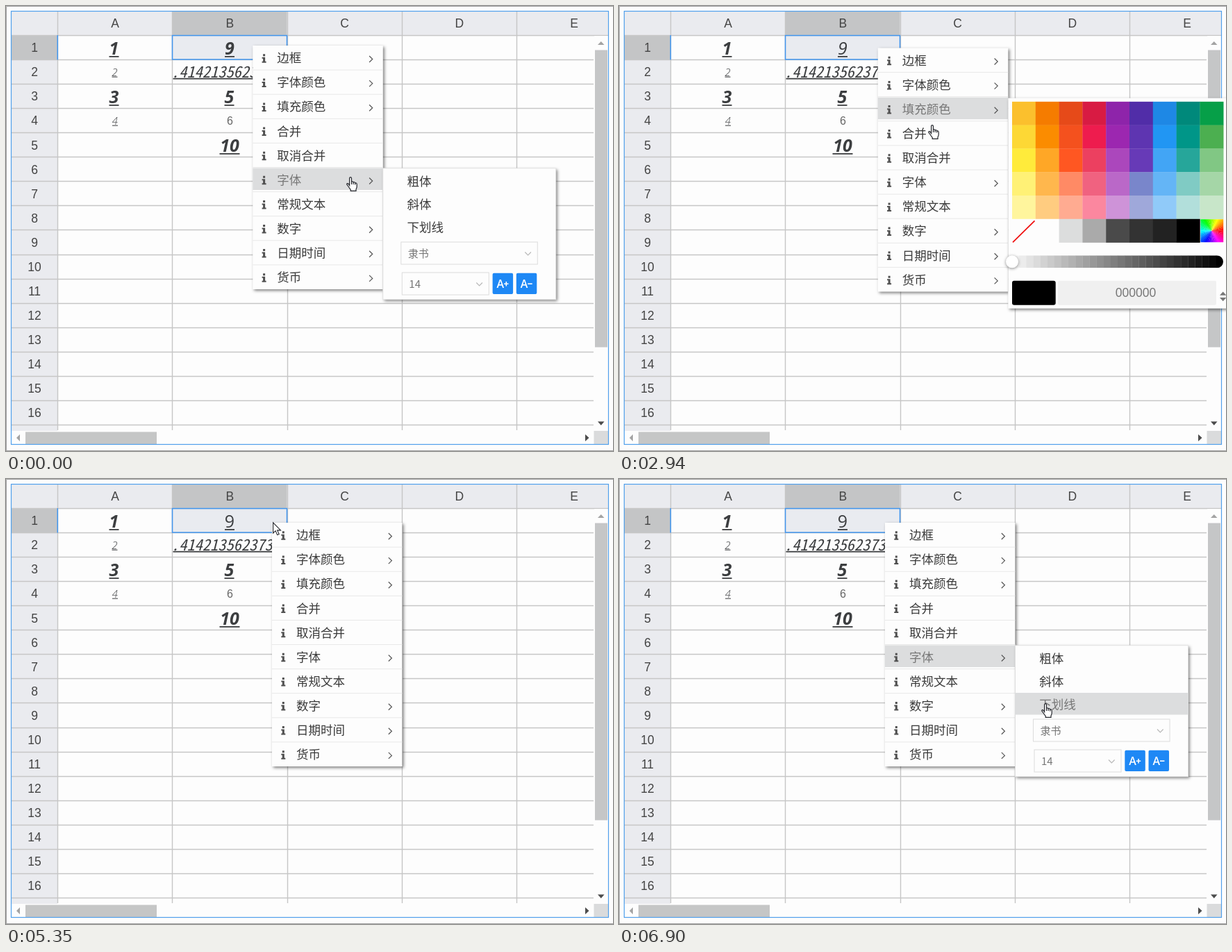
An HTML page that plays this animation: 874x641 px, repeating every 8 s.

```html
<!DOCTYPE html>
<html lang="zh">
<head>
<meta charset="utf-8">
<title>Spreadsheet context menu</title>
<style>
html, body { margin: 0; width: 100%; height: 100%; overflow: hidden; background: #fdfdfd; }
svg { display: block; }
text { white-space: pre; }
.head { font: 17.5px "Liberation Sans", Arial, sans-serif; fill: #444; text-anchor: middle; }
.cell { font-family: "Open Sans", "Noto Sans", sans-serif; fill: #3c3e40; text-anchor: middle; }
.mono { font: italic 300 22.4px "Noto Sans Mono CJK SC", Roboto, sans-serif; fill: #3c3e40; }
.cjk { font: 300 17.5px "Noto Sans CJK SC", "Noto Sans CJK", sans-serif; fill: #3a3a3a; }
.small { font-size: 15px; fill: #777; }
.panel { fill: #fdfdfd; filter: drop-shadow(2px 2px 2px rgba(0,0,0,.5)); }
.hover rect { fill: #dcddde; }
.hover text { fill: #777; }
</style>
</head>
<body>
<svg id="stage" width="874" height="641" viewBox="0 0 874 641"></svg>
<script>
const LOOP = 8000, BLUE = '#1e88f5', LINE = '#c6c6c6';
const ROW_H = 35.06, COL_W = 165.3, ITEM_H = 35.1, MENU_W = 187.5, OPTION_H = 33;

const stage = document.getElementById('stage');

function add(parent, tag, attrs = {}, text) {
  const node = document.createElementNS('http://www.w3.org/2000/svg', tag);
  for (const key in attrs) node.setAttribute(key, attrs[key]);
  if (text !== undefined) node.textContent = text;
  parent.append(node);
  return node;
}
const group = (parent, x = 0, y = 0) => add(parent, 'g', { transform: `translate(${x} ${y})` });
const rect = (parent, x, y, width, height, fill, more) =>
  add(parent, 'rect', { x, y, width, height, fill, ...more });
const path = (parent, d, fill, stroke = 'none', width = 1) =>
  add(parent, 'path', { d, fill, stroke, 'stroke-width': width });
const label = (parent, cls, x, y, text, more) => add(parent, 'text', { class: cls, x, y, ...more }, text);
const show = (node, on) => node.setAttribute('visibility', on ? 'inherit' : 'hidden');

// Sheet

const rowY = i => Math.round(42 + ROW_H * i) + .5;
const colX = i => Math.round(74 + COL_W * i) + .5;

function underlined(x, base, size, text, weight, style, width, gap) {
  const node = label(stage, 'cell', x, base, text,
    { 'font-size': size, 'font-weight': weight, 'font-style': style });
  const thick = size > 20 ? 1.8 : 1;
  rect(stage, x - width / 2, base + gap, width, thick, '#3c3e40');
  return node;
}

function drawSheet() {
  rect(stage, 0, 0, 874, 641, '#fdfdfd');
  path(stage, 'M0 640.5H874M.5 641V.5H874', 'none', '#a0a0a0');
  rect(stage, 8, 8, 859, 34, '#eaebef');
  rect(stage, 8, 42, 66, 570, '#eaebef');
  rect(stage, 239.5, 8, 165, 34, '#c4c5c6');
  rect(stage, 8, 42.5, 66, 35, '#c4c5c6');
  rect(stage, 240, 43, 164, 34, '#e9ebf0');

  let lines = '';
  for (let i = 0; i <= 16; i++) lines += `M8 ${rowY(i)}H${i ? 846 : 867}`;
  for (let i = 0; i < 5; i++) lines += `M${colX(i)} 8V611`;
  path(stage, lines, 'none', LINE, 1.4);

  for (let i = 0; i < 16; i++) label(stage, 'head', 41, 66.3 + ROW_H * i, i + 1);
  [...'ABCDE'].forEach((c, i) => label(stage, 'head', 157 + COL_W * i, 31, c));

  path(stage, 'M74.3 42V77.5M239.5 42.4H404.5V77H239.5Z', 'none', '#4095ee', 1.5);

  underlined(155.5, 70, 25, 1, 700, 'italic', 14, 2);
  underlined(156.5, 100.5, 15, 2, 300, 'italic', 8, 1.2);
  underlined(155.5, 140, 25, 3, 700, 'italic', 14, 2);
  underlined(157, 170.5, 15, 4, 300, 'italic', 8, 1.2);
  underlined(321.5, 140, 25, 5, 700, 'italic', 14, 2);
  underlined(322, 210, 25, 10, 700, 'italic', 29, 2);
  label(stage, 'head', 322.5, 171.3, 6, { style: 'font-size:16px;fill:#666' });
  const b1 = underlined(322, 70, 25, 9, 700, 'italic', 14, 2);

  const clip = add(add(stage, 'clipPath', { id: 'b2' }), 'rect', { x: 240.5, y: 78, width: 166, height: 34 });
  const root = add(stage, 'g', { 'clip-path': 'url(#b2)' });
  const digits = Math.SQRT2.toFixed(14).slice(1);
  label(root, 'mono', [...digits].map((_, i) => 238 + 11.2 * i).join(' '), 103, digits);
  rect(root, 240, 103.8, 167, 1.8, '#3c3e40');

  rect(stage, 400, 73, 7.5, 7.5, BLUE);
  return b1;
}

function drawScrollbars() {
  rect(stage, 847, 43, 20, 569, '#fdfdfd');
  rect(stage, 8, 612, 859, 19, '#fdfdfd');
  rect(stage, 848, 63.5, 18, 428, '#c5c6c7');
  rect(stage, 28, 613.5, 189, 17.5, '#c5c6c6');
  rect(stage, 846.5, 612, 20.5, 19, '#dadbdc');
  path(stage, 'M852 56L856.8 51 861.5 56ZM20 617V627L15 622Z', '#a3a3a3');
  path(stage, 'M852 598.5H861.5L856.8 604ZM834 617V627L839.5 622Z', '#4c4c4c');
  rect(stage, 7.5, 7.5, 860, 624, 'none', { stroke: '#4f9fec', 'stroke-width': 1.2 });
}

// Menu

const ITEMS = ['边框', '字体颜色', '填充颜色', '合并', '取消合并', '字体', '常规文本', '数字', '日期时间', '货币'];
const LEAVES = [3, 4, 6];
const OPTIONS = ['粗体', '斜体', '下划线'];
const FONT_ROW = 5;
const INFO = 'M-1.5-6.5h3v3h-3zM-3-2h4.5v6h1.5v2h-6v-2h1.5v-4h-1.5z';

const PALETTE = [
  'fbc02d f57c00 e64a19 d81b43 8e24aa 512da8 1e88e5 00897b 069f48',
  'fdd835 fb8c00 f4511e ee1c4e 9c27b0 5e35b1 2196f3 009688 4caf50',
  'ffeb3b ffa726 ff5722 ec4060 ab47bc 673ab7 42a5f5 26a69a 81c784',
  'fff176 ffb74d ff8a65 f06280 ba68c8 7986cb 64b5f6 80cbc4 a5d6a7',
  'fff59d ffcc80 ffab91 fb879f ce93d8 9fa8da 90caf9 b2dfdb c8e6c9',
  'fdfdfd fdfdfd dcdddd aaaaaa 4a4a4a 333333 222222 000000'
].map(line => line.split(' '));

function drawItem(parent, y, width, x, base, text) {
  const g = group(parent, 0, y);
  rect(g, 0, 0, width, 31.5, 'none');
  label(g, 'cjk', x, base, text);
  return g;
}

function drawMenu(parent) {
  rect(parent, 0, 0, MENU_W, 351, '', { class: 'panel' });
  return ITEMS.map((text, i) => {
    const y = ITEM_H * i;
    const g = drawItem(parent, y + 1, MENU_W, 35, 23.3, text);
    path(group(g, 16.3, 17.8), INFO, '#505050');
    if (!LEAVES.includes(i)) path(g, 'M167.8 14l4.6 4.5-4.6 4.5', 'none', '#555', 1.2);
    if (i) rect(parent, 0, y - .5, MENU_W, 1, '#e8e8e8');
    return g;
  });
}

function drawSelect(parent, x, y, width, text, cls) {
  rect(parent, x, y, width, 32, '#fdfdfd', { stroke: '#dcdcdc' });
  label(parent, cls, x + 10, y + 21.7, text);
  path(parent, `M${x + width - 18} ${y + 14.5}l4.3 4.3 4.3-4.3`, 'none', '#b8b8b8', 1.2);
}

function drawButton(parent, x, sign) {
  const g = group(parent, x, 327.7);
  rect(g, 0, 0, 29.5, 30.3, BLUE, { rx: 2 });
  label(g, 'cell', 11.3, 21, 'A', { style: 'font-size:16px;font-weight:600;fill:#fff' });
  path(g, sign, 'none', '#fff', 1.6);
}

function drawFontPanel(parent) {
  rect(parent, MENU_W, 176.8, 249, 189, '', { class: 'panel' });
  rect(parent, MENU_W, 176.8, 249, 189, 'none', { stroke: '#e0e0e0', 'stroke-width': .8 });
  const rows = OPTIONS.map((text, i) =>
    drawItem(group(parent, MENU_W), 179 + OPTION_H * i, 249, 34.7, 23.2, text));
  drawSelect(parent, 213.5, 283, 196.5, '隶书', 'cjk small');
  drawSelect(parent, 215, 327, 125, '14', 'cjk small');
  drawButton(parent, 345.3, 'M16.5 15.5h6.4M19.7 12.3v6.4');
  drawButton(parent, 379.5, 'M16.5 15.5h6.4');
  return rows;
}

function drawColorPanel(parent) {
  rect(parent, MENU_W, 2, 317, 303, '', { class: 'panel' });
  const g = group(parent, 193.2, 7.1), size = 33.8;
  PALETTE.forEach((line, r) => line.forEach((c, i) =>
    rect(g, i * size, r * size, size + .3, size + .3, '#' + c)));
  path(g, 'M1 202.5L32.5 171.5', 'none', '#f01010', 1.8);

  add(add(stage, 'clipPath', { id: 'wheel' }), 'rect', { x: 8 * size + 1, y: 5 * size + .5, width: 32.8, height: 33 });
  const wheel = add(g, 'g', { 'clip-path': 'url(#wheel)' });
  const cx = 8.5 * size, cy = 5.5 * size;
  const rim = a => `${cx + 26 * Math.cos(a * Math.PI / 180)} ${cy - 26 * Math.sin(a * Math.PI / 180)}`;
  for (let a = 0; a < 360; a += 6)
    path(wheel, `M${cx} ${cy}L${rim(a - .5)} ${rim(a + 6.5)}Z`, `hsl(${a} 100% 50%)`);

  add(add(stage, 'clipPath', { id: 'track' }), 'rect', { x: 0, y: 221.5, width: 304, height: 18, rx: 9 });
  const track = add(g, 'g', { 'clip-path': 'url(#track)' });
  for (let i = 0; i < 30; i++) {
    const v = Math.round(244 * (1 - i / 29));
    rect(track, i * 10.13, 221.5, 10.4, 18, `rgb(${v},${v},${v})`);
  }
  add(g, 'circle', { cx: 0, cy: 230.5, r: 9, fill: '#fff', style: 'filter:drop-shadow(0 1px 2px #0007)' });

  rect(g, 0, 258, 62.7, 35, '#000', { rx: 3 });
  rect(g, 66, 258, 228, 35, '#f0f0f0', { rx: 2 });
  label(g, 'head', 178, 281.3, '000000', { style: 'fill:#777' });
  path(g, 'M299 279l4.7-5.2 4.7 5.2ZM299 282.3h9.4l-4.7 5.2Z', '#777');
}

// Pointer

const HAND = 'M4.6 12.5V2.4Q4.6.7 6 .7T7.5 2.4V7.6Q8 6.6 9 6.8 10 7 10.1 8.2 10.8 7.3 11.8 7.7 12.7 8 12.7 9.2 ' +
  '13.5 8.6 14.3 9 15.2 9.5 15.2 10.8V14Q15.2 16 14 18V20.3H6.2V18.4Q4.5 16.5 3 14L.9 11.2Q.5 10 1.4 9.6 2.5 9.3 3.4 10.6Z' +
  'M7.5 7.6V11M10.1 8.2V11M12.7 9.2V11.4';
const ARROW = 'M.6.8V16L4.1 12.6 6.7 18.6 9.2 17.5 6.7 11.9H11.5Z';

// Each move: first step, last step, number of steps, end x, end y
const START = [490, 246];
const MOVES = [
  [60, 290, 4, 622, 257], [510, 650, 3, 627, 258], [930, 930, 1, 627, 260], [1120, 1120, 1, 629, 249],
  [1800, 2120, 6, 388, 84], [2180, 2250, 2, 367, 66], [2370, 2370, 1, 372, 61],
  [2760, 2940, 4, 445, 171], [3000, 3320, 5, 439, 248], [3410, 3540, 3, 438, 253],
  [3600, 3720, 3, 590, 262], [3790, 4010, 4, 603, 284],
  [4660, 4900, 5, 430, 110], [4960, 5170, 4, 384, 62],
  [5580, 5760, 4, 450, 162.5], [5820, 6180, 5, 444, 252],
  [6390, 6590, 4, 585, 262], [6660, 6900, 4, 608, 323]
];
// Open, close, x, y
const MENUS = [[0, 1430, 355.3, 57], [2520, 4380, 372.8, 60.5], [5350, LOOP, 383, 63]];
const ARROW_TIMES = [[1800, 2760], [4660, 5580]];

function pointerAt(t) {
  let [x, y] = START;
  for (const [from, to, steps, endX, endY] of MOVES) {
    if (t < from) break;
    const gap = (to - from) / (steps - 1) || 1;
    const p = Math.min(steps, Math.floor((t - from) / gap + .001) + 1) / steps;
    x += (endX - x) * p;
    y += (endY - y) * p;
  }
  return [x, y];
}

const b1 = drawSheet();
drawScrollbars();
const menu = group(stage);
const items = drawMenu(menu);
const colors = group(menu);
drawColorPanel(colors);
const fonts = group(menu);
const options = drawFontPanel(fonts);
const pointer = group(stage);
const hand = path(pointer, HAND, '#fff', '#23252b', 1.2);
const arrow = path(pointer, ARROW, '#fff', '#23252b', 1.1);

function render(t) {
  const [x, y] = pointerAt(t);
  const isArrow = ARROW_TIMES.some(([a, b]) => t >= a && t < b);
  pointer.setAttribute('transform', `translate(${x} ${y})`);
  show(hand, !isArrow);
  show(arrow, isArrow);

  b1.setAttribute('font-weight', t < 1430 ? 700 : 400);
  b1.setAttribute('font-style', t < 4380 ? 'italic' : 'normal');

  const open = MENUS.find(([a, b]) => t >= a && t < b);
  show(menu, open);
  if (!open) return;
  const [, , mx, my] = open;
  const dy = y - my - 6;
  const inside = x + 6 >= mx + MENU_W;
  const row = inside ? FONT_ROW : Math.floor(dy / ITEM_H);
  const option = inside ? Math.floor((dy - 179) / OPTION_H) : -1;
  menu.setAttribute('transform', `translate(${mx} ${my})`);
  items.forEach((g, i) => g.classList.toggle('hover', i === row));
  options.forEach((g, i) => g.classList.toggle('hover', i === option));
  show(fonts, row === FONT_ROW);
  show(colors, row === 1 || row === 2);
  colors.setAttribute('transform', `translate(0 ${ITEM_H * row})`);
}

const start = performance.now();
function tick() {
  render((performance.now() - start) % LOOP);
  requestAnimationFrame(tick);
}
tick();
</script>
</body>
</html>
```
